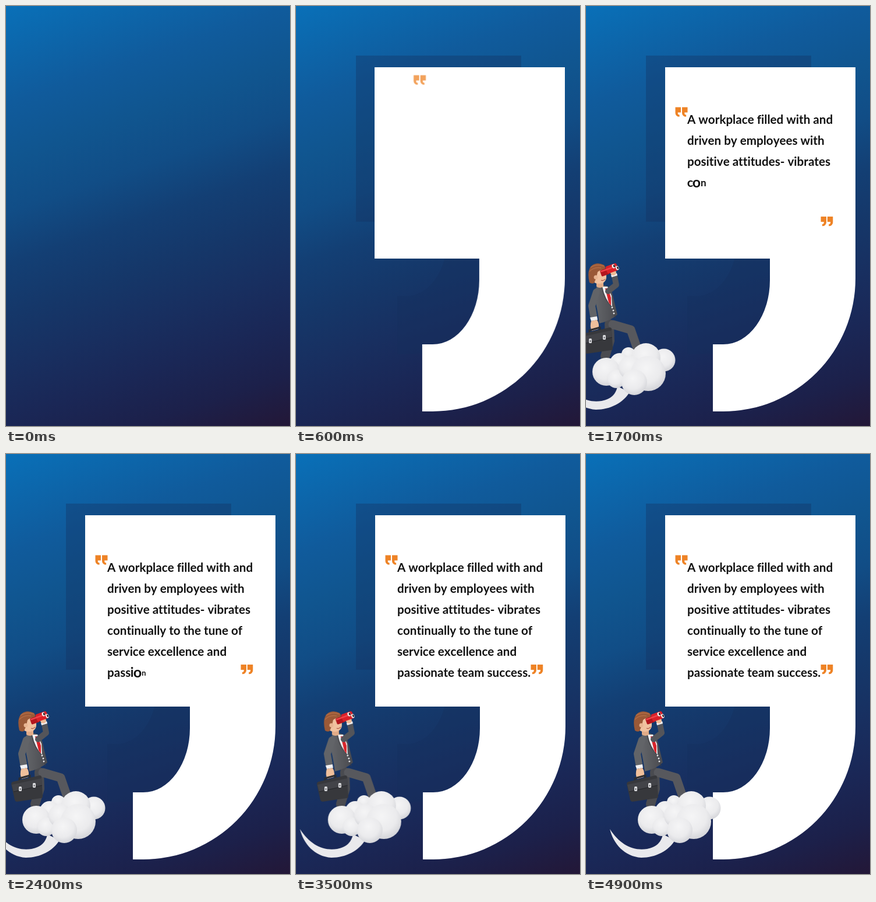
An HTML page for the animation above (5 s loop, 488 by 720 pixels).

```html
<!DOCTYPE html>
<html lang="en">
<head>
<meta charset="utf-8">
<title>Workplace quote</title>
<style>
  html, body { margin: 0; width: 100%; height: 100%; overflow: hidden; }
  #stage {
    --t: 0ms;
    position: relative; width: 488px; height: 720px; overflow: hidden;
    background: linear-gradient(161deg, #0970b8, #105b9c 19%, #10558f 30%, #114d86 40%,
      #133f74 50%, #153769 60%, #182f60 70%, #1a2756 80%, #1c204a 90%, #231737);
  }
  svg { position: absolute; inset: 0; }

  /* Paused animations are scrubbed through --t. */
  .move {
    animation: 470ms cubic-bezier(.333, .667, .667, 1) both paused;
    animation-delay: calc(var(--at) - var(--t));
  }
  .panel { animation-name: slide, appear; animation-duration: 473ms, 400ms; }
  .mark { animation-name: drop, appear; animation-duration: 600ms, 200ms; }
  .drift { --at: 0ms; animation-name: drift; animation-duration: 5000ms; animation-timing-function: linear; }
  .fade { --at: 1000ms; animation-name: show; animation-duration: 400ms; animation-timing-function: linear; }
  @keyframes slide { from { transform: translateX(-48px); } to { transform: none; } }
  @keyframes drop { from { transform: translate(70px, -79px); } to { transform: none; } }
  @keyframes drift { from { transform: translateX(-119.6px); } to { transform: translateX(2.4px); } }
  @keyframes appear { from { opacity: 0; } to { opacity: 1; } }
  @keyframes show { from { opacity: 0; } to { opacity: 1; } }

  #quote {
    position: absolute; left: 174px; top: 176px;
    font: bold 20.6px/36px Lato, "Open Sans", sans-serif; color: #111; white-space: pre;
  }
  #quote div { height: 36px; }
  #quote span { display: inline-block; transform-origin: 50% 57%; }
  .limb { fill: none; stroke-linecap: round; stroke-linejoin: round; }
</style>
</head>
<body>
<div id="stage">
  <svg width="488" height="720" viewBox="0 0 488 720">
    <defs>
      <path id="comma" d="M0 0H327V362A227 228 0 0 1 100 590H82V475H100A80 110 0 0 0 180 365V328H0Z"/>
      <radialGradient id="puff" cx=".45" cy=".35" r=".7">
        <stop offset="0" stop-color="#f5f5f6"/>
        <stop offset=".6" stop-color="#ebebed"/>
        <stop offset="1" stop-color="#cfd0d5"/>
      </radialGradient>
      <linearGradient id="suit">
        <stop offset="0" stop-color="#66686c"/>
        <stop offset="1" stop-color="#494a4f"/>
      </linearGradient>
    </defs>
    <g class="move panel" style="--at:0ms">
      <use href="#comma" transform="translate(103 85) scale(.868)" fill="#14305c" fill-opacity=".35"/>
    </g>
    <g class="move panel" style="--at:200ms">
      <use href="#comma" transform="translate(136 105)" fill="#fff"/>
    </g>
    <g fill="#ee8326">
      <g class="move mark" style="--at:500ms">
        <use href="#comma" transform="translate(163 173.5) scale(-.029 .0275)"/>
        <use href="#comma" transform="translate(174.5 173.5) scale(-.029 .0275)"/>
      </g>
      <g class="move mark" style="--at:800ms">
        <use href="#comma" transform="translate(403.5 361) scale(.029 .0275)"/>
        <use href="#comma" transform="translate(414.8 361) scale(.029 .0275)"/>
      </g>
    </g>
  </svg>

  <div id="quote"></div>

  <svg width="488" height="720" viewBox="0 0 488 720">
    <g class="move fade"><g class="move drift">
      <!-- legs -->
      <path class="limb" d="M118 545L119 574L111 600" stroke="#4a4b50" stroke-width="16"/>
      <path class="limb" d="M124 546L155 555L165 584" stroke="#57585d" stroke-width="15"/>
      <!-- cloud -->
      <path d="M41 643C58 669 80 681 105 677C122 674 130 664 132 652L153 662C142 680 120 692 95 692C66 690 47 668 41 643Z" fill="#e9e9ec"/>
      <g fill="url(#puff)">
        <circle cx="151" cy="597" r="12"/>
        <circle cx="212" cy="607" r="19.5"/>
        <circle cx="181" cy="603" r="25"/>
        <circle cx="136" cy="612" r="17"/>
        <circle cx="113" cy="627" r="24"/>
        <circle cx="130" cy="639" r="16"/>
        <circle cx="154" cy="620" r="20"/>
        <circle cx="185" cy="630" r="30"/>
        <circle cx="161" cy="645" r="22"/>
      </g>
      <!-- body -->
      <path d="M97 481Q106 476 116 481L123 492L132 529Q120 540 101 544Q98 520 91 492Z" fill="url(#suit)"/>
      <path d="M106 481L115 481L122 497L123 516Q111 504 106 481Z" fill="#f3f3f5"/>
      <path d="M111 484L116 484L121 500L121 514L117 508Z" fill="#d8242b"/>
      <path d="M105 481Q109 505 124 517L129 535" fill="none" stroke="#3c3d42"/>
      <g fill="#e8e8ea">
        <circle cx="123" cy="517" r="1.4"/><circle cx="125" cy="522" r="1.4"/><circle cx="126" cy="527" r="1.4"/>
      </g>
      <!-- raised arm -->
      <path class="limb" d="M116 489L130 478L127 463" stroke="#54555a" stroke-width="10"/>
      <path d="M121 461L131 458L132 462L122 465Z" fill="#f1f1f3"/>
      <!-- head -->
      <path d="M96 468H108V481Q102 485 96 481Z" fill="#e2ac88"/>
      <rect x="88" y="448" width="25" height="28" rx="11" fill="#f0c19f"/>
      <path d="M84 474Q79 453 88 445Q97 438 109 444Q112 447 111 452Q102 452 98 456L96 465L92 475Q88 477 84 474Z" fill="#9a5937"/>
      <path d="M86 448Q97 441 109 446M84 455Q92 447 104 449" fill="none" stroke="#b26d46" stroke-width="1.5"/>
      <circle cx="95" cy="465" r="3.5" fill="#e9b592"/>
      <path d="M104 470Q108 472 111 468" fill="none" stroke="#a94f40" stroke-width="1.2"/>
      <!-- binoculars -->
      <circle cx="125" cy="457" r="5" fill="#eebc98"/>
      <g transform="rotate(-20 118 452)">
        <rect x="102" y="448" width="15" height="11" rx="2" fill="#b3151e"/>
        <rect x="113" y="445" width="20" height="13" rx="3" fill="#db2028"/>
        <rect x="103" y="449" width="25" height="2.5" rx="1" fill="#f0444a"/>
        <ellipse cx="127" cy="449" rx="2.8" ry="3.6" fill="#f4f4f5"/>
        <ellipse cx="132" cy="454" rx="2.6" ry="3.6" fill="#f4f4f5"/>
        <ellipse cx="128" cy="449" rx="1.4" ry="2.2" fill="#25171b"/>
        <ellipse cx="132.7" cy="454" rx="1.3" ry="2.2" fill="#25171b"/>
      </g>
      <!-- lowered arm and briefcase -->
      <path class="limb" d="M96 490L88 514L91 531" stroke="#626468" stroke-width="12"/>
      <path d="M85 534L97 532L98 538L87 540Z" fill="#f1f1f3"/>
      <path d="M87 540L97 538Q102 546 99 554L88 557Q84 549 87 540Z" fill="#efbf9b"/>
      <path class="limb" d="M84 562V556L102 551V557" stroke="#2c2d31" stroke-width="3"/>
      <path d="M72 562L119 551Q122 551 122 554L124 587Q124 590 121 590L80 596Q77 596 76 593L70 566Q70 563 72 562Z" fill="#37383c"/>
      <path d="M71 567L122 556L123 568L74 579Z" fill="#424348"/>
      <path d="M74 579L123 568" stroke="#27282c" stroke-width="1.2"/>
      <g fill="#dcdde0">
        <rect x="83" y="570" width="5" height="8" rx="1.5"/>
        <rect x="107" y="564" width="5" height="8" rx="1.5"/>
      </g>
      <path d="M85.5 573V576M109.500 567V570" stroke="#55565a" stroke-width="1.5"/>
    </g></g>
  </svg>
</div>
<script>
  const LOOP = 5000, STEP = 100, TYPE_START = 600, CHAR_MS = 13;
  const lines = [
    'A workplace filled with and',
    'driven by employees with',
    'positive attitudes- vibrates',
    'continually to the tune of',
    'service excellence and',
    'passionate team success.'
  ];
  const stage = document.getElementById('stage');
  const quote = document.getElementById('quote');
  const letters = [];

  let index = 0;
  for (const line of lines) {
    const row = quote.appendChild(document.createElement('div'));
    for (const char of line) {
      const el = row.appendChild(document.createElement('span'));
      el.textContent = char;
      letters.push({ el, index: index++ });
    }
    index++; // the line break takes one beat
  }

  // Letters pop up past full size, then settle.
  function popScale(age) {
    if (age <= 0) return 0;
    return Math.min(1.35 * age, Math.max(1, 1.45 - 0.15 * age));
  }

  function draw(t) {
    stage.style.setProperty('--t', t + 'ms');
    const typed = (t - TYPE_START) / CHAR_MS;
    for (const { el, index } of letters) {
      const scale = popScale(typed - index);
      el.style.transform = scale === 1 ? 'none' : `scale(${scale})`;
    }
  }

  let last = -1;
  function tick() {
    let t = Math.floor(performance.now() % LOOP / STEP) * STEP;
    if (t < 2 * STEP) t = 0; // the opening picture holds for two steps
    if (t !== last) draw(last = t);
    requestAnimationFrame(tick);
  }
  tick();
</script>
</body>
</html>
```
